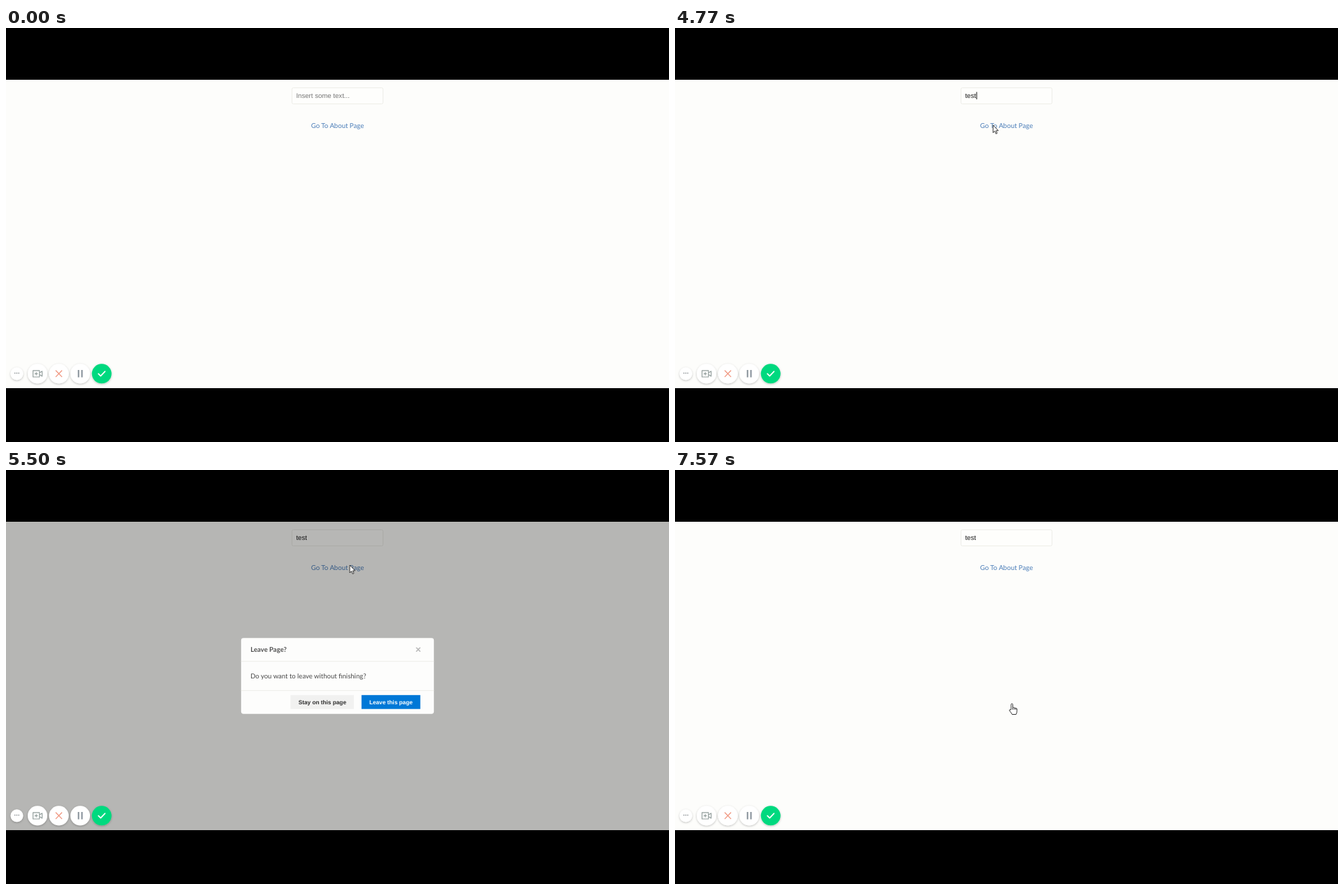
These frames come from a looping animation (947 px wide and 592 px high, 8 s). An HTML page:

```html
<!DOCTYPE html>
<html lang="en">
<head>
<meta charset="utf-8">
<title>Leave page prompt</title>
<style>
  html, body { margin: 0; width: 100%; height: 100%; overflow: hidden; background: #000; }
  svg { display: block; width: 100%; height: 100%; }
  text { white-space: pre; text-rendering: geometricPrecision; }
  .lato { font: 9.58px Lato, sans-serif; }
  .bold { font-weight: 700; }
  .arial { font: 9.65px "Liberation Sans", Arial, sans-serif; }
  .button { font-size: 8.3px; font-weight: 700; }
  .line { fill: none; stroke-linecap: round; stroke-linejoin: round; }
</style>
</head>
<body>
<svg viewBox="0 0 947 592">
  <defs>
    <filter id="soft" x="-40%" y="-40%" width="180%" height="180%">
      <feDropShadow dx="0" dy="1" stdDeviation="1.4" flood-color="#000" flood-opacity=".26"/>
    </filter>
  </defs>

  <rect width="947" height="592"/>
  <rect y="74" width="947" height="441" fill="#fdfdfb"/>

  <rect x="408.5" y="85.5" width="130" height="23" rx="2" fill="#fefefc" stroke="#eeeee8"/>
  <text id="field" class="arial" x="414.4" y="100.4"></text>
  <rect id="caret" y="91.5" width="1" height="10.5" fill="#111"/>
  <text class="lato" x="473.5" y="143.3" text-anchor="middle" fill="#4a7db8">Go To About Page</text>

  <rect id="shade" y="74" width="947" height="441" opacity="0"/>

  <g id="dialog">
    <rect x="335" y="240" width="277" height="109" rx="3.5" fill="#fdfdfc"/>
    <path d="M335 273.5H612M335 315.5H612" stroke="#eeeeea"/>
    <text class="lato bold" x="348.6" y="260.3" fill="#505050">Leave Page?</text>
    <path class="line" d="M587 254l5 5m0-5l-5 5" stroke="#b9b9b9" stroke-width="1.6"/>
    <text class="lato" x="348.4" y="298.2" fill="#484848">Do you want to leave without finishing?</text>
    <rect x="406" y="322" width="91" height="20" fill="#f1f1f0"/>
    <text class="arial button" x="451.7" y="335" text-anchor="middle" fill="#303030">Stay on this page</text>
    <rect x="508" y="322" width="84.5" height="20" fill="#0078d7"/>
    <text class="arial button" x="550.3" y="335" text-anchor="middle" fill="#fff">Leave this page</text>
  </g>

  <g id="tools">
    <g fill="#fff" filter="url(#soft)">
      <circle cx="15.5" cy="494.3" r="9"/>
      <circle cx="45" cy="494.3" r="14"/>
      <circle cx="75.5" cy="494.3" r="14"/>
      <circle cx="106" cy="494.3" r="14"/>
      <circle cx="136.7" cy="494.3" r="14" fill="#00d97f"/>
    </g>
    <path class="line" d="M12.8 493.5h0M15.5 493.5h0M18.2 493.5h0" stroke="#6c7378" stroke-width="1.5"/>
    <path class="line" d="M38.6 489.8h9.2v9.2h-9.2zM47.8 493.2l3.8-2.4v7.2l-3.8-2.4M43.2 492.6v3.6M41.4 494.4h3.6" stroke="#929e9c" stroke-width="1.15"/>
    <path class="line" d="M71.3 490l8.4 8.6m0-8.6l-8.4 8.6" stroke="#f0967f" stroke-width="1.3"/>
    <path d="M103.6 489v10.4M108.5 489v10.4" stroke="#808b94" stroke-width="1.9"/>
    <path class="line" d="M132 494.4l3.2 3.2 6.2-6.4" stroke="#fff" stroke-width="1.7"/>
  </g>

  <g id="pointer">
    <path id="arrow" d="M0 0V11l2.5-2.4 1.6 3.9 1.8-.8-1.6-3.7H7.6z" fill="#fff" stroke="#222" stroke-width=".9"/>
    <path id="beam" d="M.5-5V5" stroke="#555" stroke-width=".8"/>
    <path id="hand" d="M-1.2 8.5V1.2a1.2 1.2 0 0 1 2.4 0V5.5q1.2-.6 2.2.5q1.2-.4 2 .5q1.6-.2 1.7 1.3V10.5q0 2.5-1.3 4.8H.2Q-1 12.8-3.6 9.8q-.6-1.7 2.4-1.3zM1.2 5.5v3M3.4 6v2.5M5.4 6.5v2" fill="#fff" stroke="#222" stroke-width=".9"/>
  </g>
</svg>

<script>
const LOOP = 8000;
const OPEN = 5310;
const CLOSE = 7480;
const SHADE = 0.47;
const KEYS = [2400, 2630, 2870, 3130];
const WORD = "test";

// Pointer stops: time, x, y, shape shown from then on
const STOPS = [
  [170, 586, 121, "arrow"],
  [230, 584, 119, "arrow"],
  [370, 584, 119, "arrow"],
  [650, 539, 104, "beam"],
  [1170, 415.5, 97, "beam"],
  [1450, 415.5, 97, "beam"],
  [1620, 426, 110, "arrow"],
  [1970, 438, 140, "arrow"],
  [KEYS[0], 438, 140, ""],
  [4480, 438, 140, "arrow"],
  [5270, 491, 136, "arrow"],
  [6300, 491, 136, "arrow"],
  [6420, 497.3, 331.2, "hand"],
  [6460, 497.3, 331.2, "hand"],
  [6870, 481.3, 334.2, "hand"],
  [LOOP, 481.3, 334.2, "hand"]
];

const $ = id => document.getElementById(id);
const clamp = v => Math.min(1, Math.max(0, v));
const ramp = (t, from, to) => clamp((t - from) / (to - from));
const ease = p => p * p * (3 - 2 * p);
const mix = (a, b, p) => a + (b - a) * p;
const show = (id, on) => $(id).setAttribute("visibility", on ? "visible" : "hidden");

function drawField(t) {
  const typed = WORD.slice(0, KEYS.filter(k => t >= k).length);
  const field = $("field");
  field.textContent = typed || "Insert some text...";
  field.setAttribute("fill", typed ? "#1c1c1c" : "#777");
  const width = typed ? field.getComputedTextLength() : 0;
  $("caret").setAttribute("x", 414.4 + width + (typed ? 0.5 : 0));
  const on = (t >= 1200 && t < 1700) || (t >= 2200 && t < 3970) || (t >= 4470 && t < 4970);
  show("caret", on);
}

function drawDialog(t) {
  const out = 1 - ramp(t, CLOSE, CLOSE + 90);
  const left = 1 - ramp(t, OPEN, OPEN + 300);
  const scale = 1 - 0.123 * left ** 3;
  $("shade").setAttribute("opacity", SHADE * ramp(t, OPEN, OPEN + 320) * out);
  $("dialog").setAttribute("opacity", ramp(t, OPEN - 15, OPEN + 25) * out);
  $("dialog").setAttribute("transform", `translate(473.5 294.5) scale(${scale}) translate(-473.5 -294.5)`);
}

function drawPointer(t) {
  let i = -1;
  while (i + 1 < STOPS.length && t >= STOPS[i + 1][0]) i++;
  const a = STOPS[i];
  const shape = a ? a[3] : "";
  for (const id of ["arrow", "beam", "hand"]) show(id, id === shape);
  if (!a) return;
  const b = STOPS[i + 1] || a;
  const p = a === b ? 0 : ease(ramp(t, a[0], b[0]));
  $("pointer").setAttribute("transform", `translate(${mix(a[1], b[1], p)} ${mix(a[2], b[2], p)})`);
}

function draw(t) {
  drawField(t);
  drawDialog(t);
  drawPointer(t);
}

const start = performance.now();
function tick() {
  draw((performance.now() - start) % LOOP);
  requestAnimationFrame(tick);
}
tick();
</script>
</body>
</html>
```
